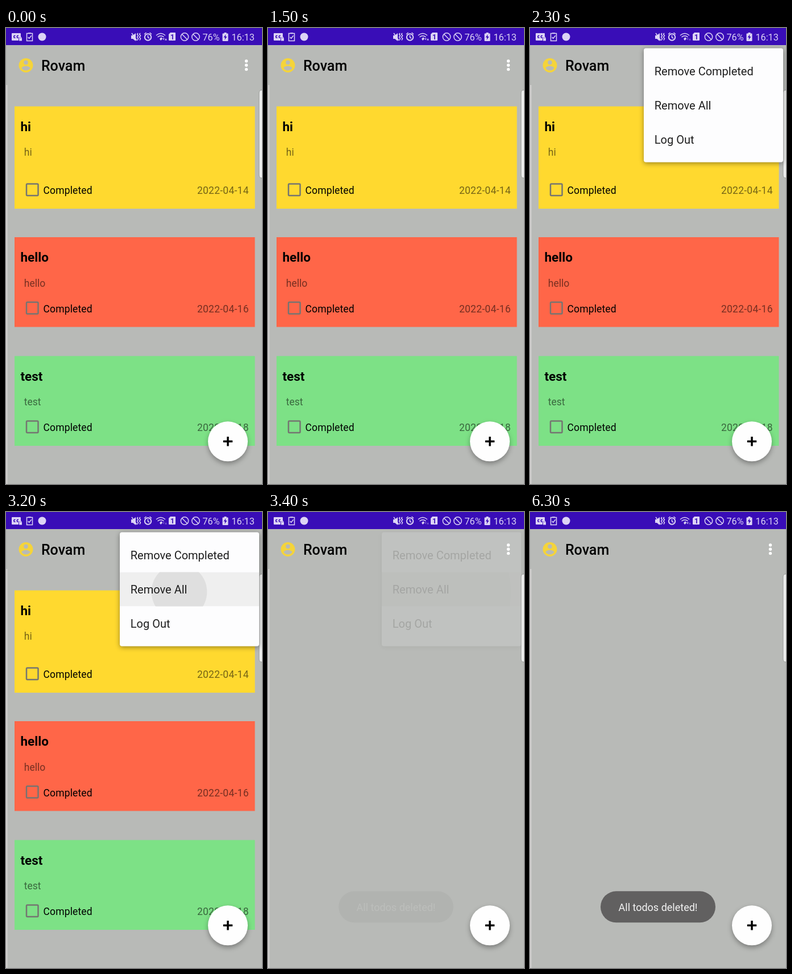
These frames come from a looping animation (450x800 px, 8.8 s). An HTML page:

```html
<!DOCTYPE html>
<html lang="en">
<head>
<meta charset="utf-8">
<title>Todo list</title>
<style>
  html, body { margin: 0; width: 100%; height: 100%; overflow: hidden; background: #b8bab7; }
  svg { display: block; width: 100vw; height: 100vh; font-family: Roboto, sans-serif; }
  .title { font-size: 22.5px; font-weight: 700; }
  .note, .done, .date { font-size: 17.5px; }
  .note, .date { fill-opacity: .54; }
  .done { letter-spacing: .15px; }
  .date { letter-spacing: .25px; text-anchor: end; }
  .status { font-size: 16.2px; fill: #dcd3f5; }
  .lines { fill: none; stroke: #dcd3f5; stroke-width: 1.5; }
  .solid { fill: #dcd3f5; }
  #items text { font-size: 20px; fill: #1e1e1e; }
  #panel { filter: drop-shadow(0 2px 4px rgba(0,0,0,.4)); }
  #fab circle { filter: drop-shadow(0 4px 4px rgba(0,0,0,.32)); }
</style>
</head>
<body>
<svg viewBox="0 0 450 800">
  <defs>
    <clipPath id="reveal"><rect id="revealRect"/></clipPath>
    <clipPath id="row"><rect x="200" y="105.5" width="245" height="60"/></clipPath>
  </defs>
  <rect width="450" height="800" fill="#b8bab7"/>
  <rect y="100" width="2.5" height="700" fill="#d2d0cf"/>

  <!-- Status bar -->
  <rect width="450" height="30" fill="#390db7"/>
  <g class="solid">
    <path fill-rule="evenodd" d="M11 9h14q1 0 1 1v6h-2q-2 1-2 4v2H11q-1 0-1-1V10q0-1 1-1z"/>
    <rect x="23" y="18" width="5" height="4.5"/>
    <circle cx="63.5" cy="15.5" r="7"/>
    <path d="M220 13h3l5-4v14l-5-4h-3z"/>
    <path d="M286 11l3-3h8q1 0 1 1v12q0 1-1 1h-10q-1 0-1-1z"/>
    <path d="M383.5 8h4v1.5h2q1 0 1 1V22q0 1-1 1h-8q-1 0-1-1V10.500q0-1 1-1h2z"/>
    <path d="M270 19l3-3 2 3-3 3z"/>
  </g>
  <g class="lines">
    <path stroke="#390db7" d="M16.500 13.500h-2q-1.500 1.800 0 3.500h2M22 13.500h-2q-1.500 1.800 0 3.500h2"/>
    <path d="M24.300 18v-1q1.200-1.800 2.400 0v1"/>
    <path d="M36.500 9.500h10v13h-10zM39 9h5M38.700 16l2 2.300 4-5"/>
    <path d="M221 9l9 13M232 9l-1.500 2 2 2.500-2 2.500 2 2.500-1.500 3M236 9l-1.500 2 2 2.500-2 2.500 2 2.500-1.500 3"/>
    <circle cx="249.500" cy="16" r="5.700" stroke-width="2"/>
    <path d="M243 11l3.500-3M256 11l-3.500-3M249.500 12.500v4l2.500 1.500"/>
    <path d="M264 13q8-7 16 0M266.500 16q5.500-4.500 11 0"/>
    <circle cx="314" cy="15.500" r="6.700"/><path d="M309.300 10.800l9.400 9.400"/>
    <circle cx="333.500" cy="15.500" r="6.700"/><path d="M328.800 10.800l9.400 9.400"/>
  </g>
  <g class="solid">
    <path id="download" d="M275 18h4l-2 3.500z"/>
    <path id="upload" d="M279 21.500h4l-2-3.500z"/>
  </g>
  <text x="289" y="19.500" font-size="12" font-weight="700" fill="#390db7">1</text>
  <path d="M386.500 11l-4 5.500h2.500l-.5 4.500 4-6h-2.500z" fill="#390db7"/>
  <text class="status" x="345.500" y="22">76%</text>
  <text class="status" x="396.500" y="22">16:13</text>

  <!-- App bar -->
  <path transform="translate(20 50.500) scale(1.250)" fill="#f5d43a" fill-rule="evenodd"
    d="M12 2a10 10 0 100 20 10 10 0 000-20zM12 5a3 3 0 110 6 3 3 0 010-6zM12 19.200c-2.500 0-4.710-1.280-6-3.220.03-1.990 4-3.080 6-3.080s5.970 1.090 6 3.080c-1.290 1.940-3.500 3.220-6 3.220z"/>
  <text x="62" y="74.500" font-size="25" font-weight="500">Rovam</text>
  <g fill="#fff"><circle cx="422.500" cy="58" r="2.700"/><circle cx="422.500" cy="65.300" r="2.700"/><circle cx="422.500" cy="72.600" r="2.700"/></g>

  <g id="cards"></g>
  <path d="M451 109h-2q-4 0-4 5v144q0 5 4 5h2z" fill="#eeefee" stroke="#8f918f" stroke-width=".8"/>

  <g id="fab">
    <circle cx="390" cy="725.300" r="35" fill="#fefefe"/>
    <path d="M381.800 725.300h16.400M390 717.100v16.400" stroke="#000" stroke-width="3.500"/>
  </g>

  <g id="menu">
    <rect id="panel" fill="#fdfdfe"/>
    <g clip-path="url(#reveal)">
      <g id="items">
        <g id="press" clip-path="url(#row)">
          <rect x="200" y="105.500" width="245" height="60" fill="#efefef"/>
          <circle id="ripple" cx="304.500" cy="140" fill="#dfdfdf"/>
        </g>
        <text x="218.800" y="83">Remove Completed</text>
        <text x="218.800" y="143">Remove All</text>
        <text x="218.800" y="203">Log Out</text>
      </g>
    </g>
  </g>

  <g id="toast">
    <rect x="124" y="665.300" width="202" height="55" rx="27.500" fill="#616060"/>
    <text x="225" y="699.500" font-size="18" text-anchor="middle" fill="#f3f3f3">All todos deleted!</text>
  </g>
</svg>
<script>
const LOOP = 8800, STEP = 100;
const el = id => document.getElementById(id);
const clamp = v => Math.min(1, Math.max(0, v));
const set = (id, attrs) => {
  for (const name in attrs) el(id).setAttribute(name, attrs[name]);
};

// Standard Material curve, cubic-bezier(.4, 0, .2, 1).
function fastOutSlowIn(x) {
  let low = 0, high = 1;
  for (let i = 0; i < 20; i++) {
    const s = (low + high) / 2;
    if (3 * s * (1 - s) ** 2 * .4 + 3 * s * s * (1 - s) * .2 + s ** 3 < x) low = s;
    else high = s;
  }
  return low * low * (3 - 2 * low);
}

function card(text, color, date, top, bottom) {
  return `<rect x="15" y="${top}" width="422.500" height="${bottom - top}" fill="${color}"/>
    <text class="title" x="25.500" y="${top + 43}">${text}</text>
    <text class="note" x="31.800" y="${top + 86.500}">${text}</text>
    <rect x="36" y="${bottom - 43.500}" width="20.500" height="20.500" rx="1.500" fill="none" stroke="#757571" stroke-width="2.500"/>
    <text class="done" x="65.500" y="${bottom - 26}">Completed</text>
    <text class="date" x="426.800" y="${bottom - 26}">${date}</text>`;
}
el("cards").innerHTML =
  card("hi", "#ffd92f", "2022-04-14", 137.5, 317) +
  card("hello", "#ff6648", "2022-04-16", 367, 524.5) +
  card("test", "#7de186", "2022-04-18", 575.5, 733);

function drawMenu(t) {
  const alpha = t < 3000 ? clamp((t - 1545) / 100) : clamp(1 - (t - 3225) / 200);
  const hidden = 1 - fastOutSlowIn(clamp((t - 1545) / 250));
  const left = 200 + 188 * hidden, bottom = 235.5 - 155 * hidden;
  const box = { x: left, y: 35.5, width: 445 - left, height: bottom - 35.5, rx: hidden > .01 ? 0 : 4 };
  set("menu", { opacity: alpha });
  set("panel", box);
  set("revealRect", box);
  set("items", { transform: `translate(${100 * hidden} ${-71 * hidden})` });
  set("press", { opacity: t < 3100 ? 0 : 1 });
  set("ripple", { r: Math.max(0, .37 * (t - 3068)), opacity: t < 3300 ? 1 : .6 });
}

function draw(now) {
  const t = Math.floor(now % LOOP / STEP) * STEP;
  set("cards", { opacity: t < 3300 ? 1 : 0 });
  set("download", { opacity: t < 2300 || t >= 6300 ? .75 : .35 });
  set("upload", { opacity: t < 2300 ? .9 : .4 });
  drawMenu(t);
  set("toast", { opacity: clamp((t - 3380) / 300) });
}

const start = performance.now();
function tick() {
  draw(performance.now() - start);
  requestAnimationFrame(tick);
}
tick();
</script>
</body>
</html>
```
